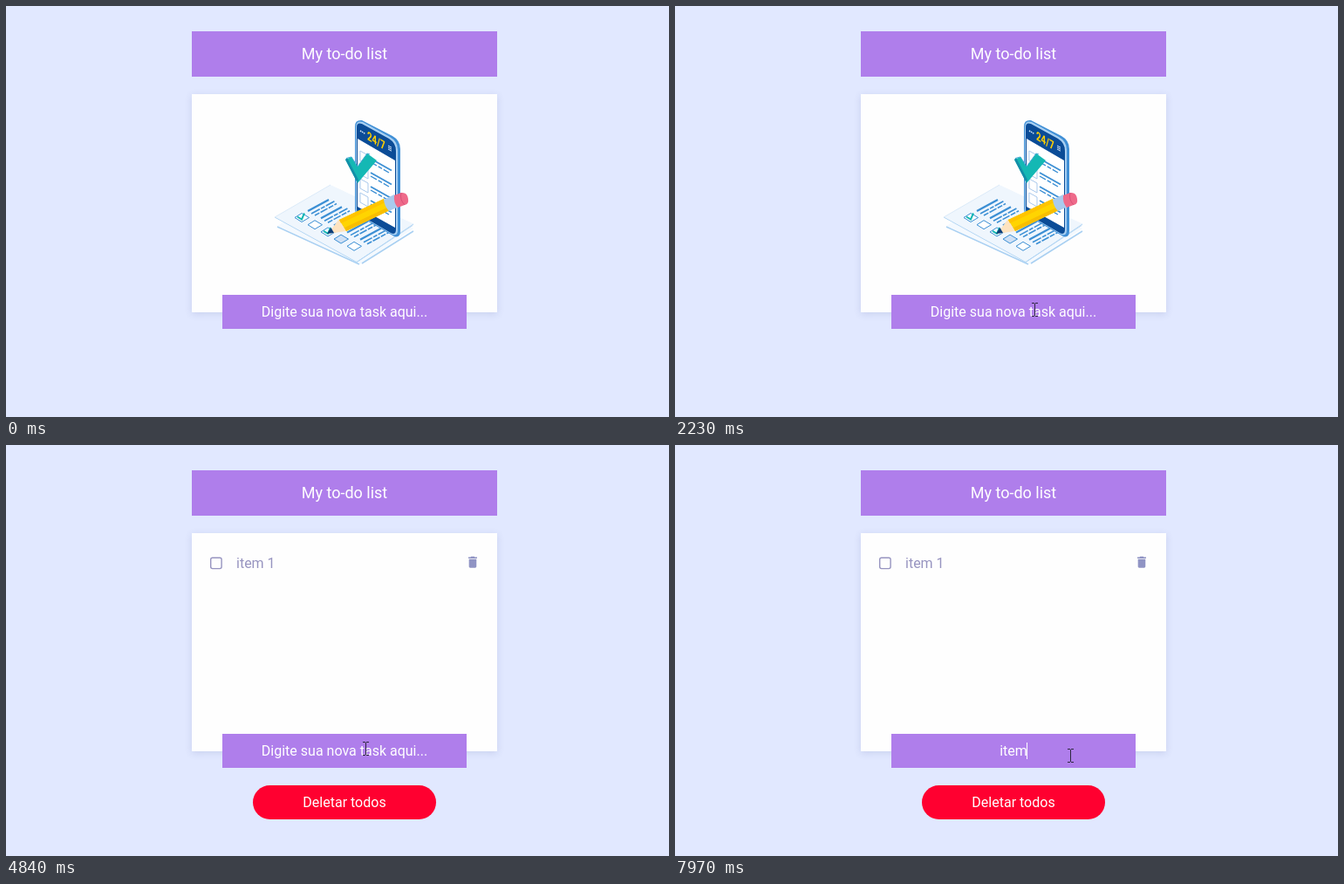
Write an HTML page that moves like this. It is 760 by 471 pixels and loops after 8000 ms.

```html
<!DOCTYPE html>
<html lang="pt">
<head>
<meta charset="utf-8">
<title>My to-do list</title>
<style>
  html, body { margin: 0; width: 100%; height: 100%; overflow: hidden; }
  body { position: relative; background: #e1e8ff; font: 16px Roboto, sans-serif; color: #fff; }
  body > * { position: absolute; box-sizing: border-box; text-align: center; white-space: pre; }
  #title { left: 213px; top: 29px; width: 350px; height: 52px; font-size: 18px; line-height: 52px; background: #af7eeb; }
  #card { left: 213px; top: 101px; width: 350px; height: 250px; background: #fefefe; box-shadow: 0 2px 8px rgba(60, 75, 140, .15); }
  .bar { left: 248px; top: 331px; width: 280px; height: 39px; line-height: 39px; }
  #field { background: #af7eeb; }
  #caret { display: inline-block; width: 1px; height: 19px; margin: 10px -.6px 0 -.4px; vertical-align: top; background: #fff; }
  #item { left: 264px; top: 126px; line-height: 19px; color: #9794c0; }
  #clear { left: 283px; top: 390px; width: 210px; height: 39px; line-height: 39px; border-radius: 20px; background: #ff0030; }
  svg { left: 0; top: 0; }
</style>
</head>
<body>
<div id="title">My to-do list</div>
<div id="card"></div>

<svg id="art" width="760" height="471" fill="none">
  <!-- sheets -->
  <path d="M311 252L373 216L467 255L406 296Z" fill="#f4f9fe"/>
  <path d="M311 253L405 296M408 295L467 258M402 293L466 251" stroke="#a9d0f2" stroke-width="1.5"/>
  <path d="M308 242L372 205L468 250L402 293Z" fill="#eff6fd"/>
  <path d="M308 242L402 293.5L467 250" stroke="#b5d7f4"/>
  <path d="M308 242L372 205" stroke="#dcebf9"/>
  <g id="rows"></g>

  <!-- phone -->
  <path d="M400 138Q400 130 408 131L443 149Q452 154 452 164V258Q452 266 445 264L405 241Q400 238 400 232Z" fill="#3f8fd6"/>
  <path d="M401 138Q402 131 409 133L440 150Q449 155 449 165V257Q449 264 443 262L404 239Q401 237 401 232Z" fill="#a9d0f2"/>
  <path d="M402 139Q402 133 408 135L439 152Q447 157 447 166V256Q447 263 441 260L405 239Q402 237 402 232Z" fill="#0b4c97"/>
  <path d="M403 152L446 177V254L403 230Z" fill="#fff"/>
  <path d="M406 143L412 146.500" stroke="#d8e8f8" stroke-width="1.5" stroke-dasharray="1.5 .8"/>
  <path d="M438 160l4 2.200m-4 -.2l4 2.200m-4 -.2l4 2.200" stroke="#d8e8f8"/>
  <text transform="matrix(.7 .42 0 1 414 153)" font-family="Roboto, sans-serif" font-size="14" font-weight="700" fill="#ffd000">24/7</text>
  <g id="tasks"></g>

  <!-- check mark -->
  <path d="M389 176L396 173L403 184L414 169L425 177L403 203Z" fill="#14b8b4"/>
  <path d="M389 176L391 174L404 199L403 203Z" fill="#138ea8"/>
  <path d="M390 174.500L396 173L403 184L414 169L417 170" stroke="#3fa9d2"/>

  <!-- pencil -->
  <path d="M369 261L382 244L390 258Z" fill="#fde3c0"/>
  <path d="M368 261L372.500 254L376 260Z" fill="#0b3d78"/>
  <path d="M382 245L433 221L440 234L390 258Z" fill="#ffd400"/>
  <path d="M382 245L433 221L435 225L384 249Z" fill="#ffc400"/>
  <path d="M388 254L438 230.500L440 234L390 258Z" fill="#f8be00"/>
  <path d="M433 222L445 216Q451 222 450 230L439 235Q434 230 433 222Z" fill="#a9cbee"/>
  <path d="M445 217L453 214Q460 213 461 221Q462 227 457 228L449 231Q444 225 445 217Z" fill="#ee6a8a"/>
  <path d="M453 214Q451 222 457 228" stroke="#d94f78"/>
</svg>

<div id="field" class="bar"></div>
<div id="hint" class="bar">Digite sua nova task aqui...</div>
<div id="typed" class="bar"><span id="word"></span><span id="caret"></span></div>

<div id="item">item 1</div>
<div id="clear">Deletar todos</div>
<svg id="icons" width="760" height="471" fill="none">
  <rect x="234.700" y="129.200" width="12.400" height="12.400" rx="2" stroke="#9794c0" stroke-width="1.400"/>
  <path transform="translate(526.400 125.700) scale(.715)" fill="#9094c4" d="M6 19c0 1.100.9 2 2 2h8c1.100 0 2-.9 2-2V7H6zM19 4h-3.500l-1-1h-5l-1 1H5v2h14z"/>
</svg>

<svg id="mouse" width="760" height="471" fill="none">
  <circle id="press" cx="-2" cy="-1" r="12" fill="#ff0" fill-opacity=".47"/>
  <path id="arrow" d="M.5 .5V16.500L4.300 13L6.700 18.400L9 17.400L6.600 12.200H11.500Z" fill="#fff" stroke="#000"/>
  <path id="beam" d="M-3 -7.500H0M1 -7.500H4M.5 -7V7M-3 7.500H0M1 7.500H4" stroke="#2e2840"/>
</svg>

<script>
const $ = id => document.getElementById(id);
const line = (x, y, dx, dy, w, dash = '') =>
  `<path d="M${x} ${y}l${dx} ${dy}" stroke="#3b8fd4" stroke-width="${w}" stroke-dasharray="${dash}"/>`;

// Sheet rows run down and to the right in equal steps.
let rows = '';
for (let i = 0; i < 5; i++) {
  const x = 331 + 15 * i, y = 242.5 + 8.2 * i;
  const ticked = i === 0 || i === 2;
  rows += `<path d="M${x} ${y}l8 -5l8.500 5l-8.500 5z" stroke="#3b8fd4" fill="${i === 3 ? '#cfe0f4' : '#fff'}"/>`;
  if (ticked) rows += `<path d="M${x + 3} ${y - 1}l5 3l3 -7" stroke="#14b8b4" stroke-width="2"/>`;
  rows += line(x + 15, y - 7.5, 24, -13, 2.2);
  rows += line(x + 19, y - 4.5, 27, -14.5, 1.6, '11 1.5 5 1.5');
  rows += line(x + 23, y - 2.5, 25, -13.5, 1.6, '6 1.5 9 1.5');
}
$('rows').innerHTML = rows;

let tasks = '';
for (let i = 0; i < 4; i++) {
  const y = 166 + 16 * i;
  tasks += `<path d="M406 ${y}l9 5v11l-9 -5z" stroke="#a9c9ec"/>`;
  tasks += line(418, y + 9, 24, 13.5, 1.8);
  tasks += line(418, y + 13, 21, 12, 1.4, '8 2 5 2');
}
$('tasks').innerHTML = tasks;

// Each table holds its value until the next time.
const at = (table, t) => {
  let row = table[0];
  for (const next of table) if (next[0] <= t) row = next;
  return row;
};

const moves = [
  [0, 800, 500], [390, 578, 450], [460, 520, 432], [530, 466, 415], [610, 425, 401],
  [680, 396, 390], [750, 386, 384], [870, 388, 372], [940, 398, 358], [1010, 407, 350],
  [1080, 411, 348], [1150, 417, 348], [1220, 415, 348], [1290, 412, 348],
  [5500, 428, 343], [5570, 456, 342], [5640, 480, 346], [5710, 471, 352],
  [5780, 459, 355], [5850, 453, 356]
];
const words = [
  [0, ''], [2430, 'i'], [2830, 'it'], [3030, 'ite'], [3300, 'item'], [3630, 'item '],
  [3960, 'item 1'], [4840, ''], [6900, 'i'], [7360, 'it'], [7490, 'ite'], [7970, 'item']
];
const blinks = [
  [0, false], [1620, true], [2230, false], [2430, true], [4510, false],
  [5040, true], [5570, false], [6110, true]
];
const clicks = [[0, false], [1620, true], [1900, false], [6370, true], [6640, false]];

const show = (id, on) => { $(id).style.visibility = on ? 'visible' : 'hidden'; };

function draw(t) {
  const [, x, y] = at(moves, t);
  const word = at(words, t)[1];
  const added = t >= 4840;
  const overField = y < 370;

  $('word').textContent = word;
  show('hint', !word);
  show('caret', at(blinks, t)[1]);
  show('art', !added);
  for (const id of ['item', 'icons', 'clear']) show(id, added);

  $('mouse').style.transform = `translate(${x}px, ${y}px)`;
  $('mouse').style.overflow = 'visible';
  show('press', at(clicks, t)[1]);
  show('beam', overField);
  show('arrow', !overField);
}

const start = performance.now();
function tick() {
  draw((performance.now() - start) % 8000);
  requestAnimationFrame(tick);
}
tick();
</script>
</body>
</html>
```
